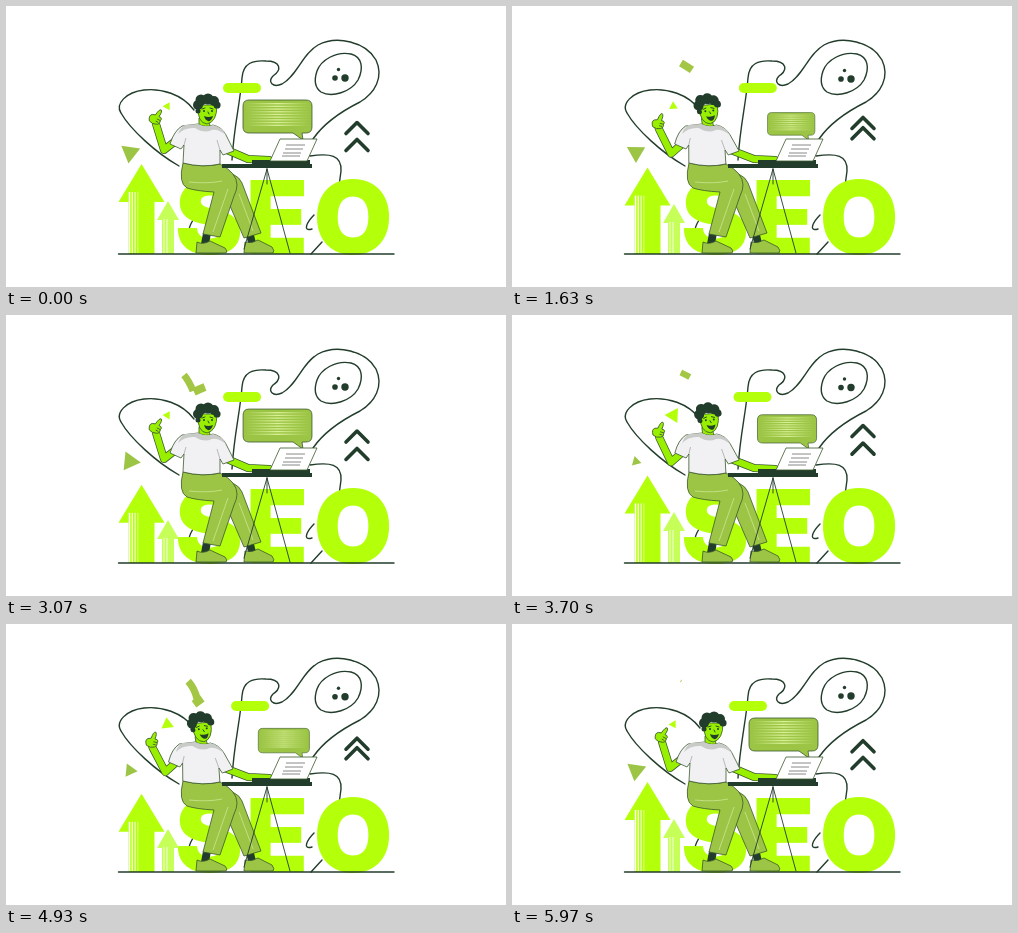
These frames come from a looping animation (500x281 px, 6000 ms). An HTML page:

```html
<!DOCTYPE html>
<html lang="en">
<head>
<meta charset="utf-8">
<title>SEO illustration</title>
<style>
  html, body { margin: 0; width: 100%; height: 100%; overflow: hidden; background: #fff; }
  svg { display: block; width: 100%; height: 100%; }
  .lime { fill: #b4ff0a; }
  .skin { fill: #98f000; }
  .olive { fill: #9cc545; }
  .dark { fill: #223d2b; }
  .edge { stroke: #3c5a2c; stroke-width: .8; stroke-linejoin: round; }
  .line { fill: none; stroke: #223d2b; stroke-width: 1.4; stroke-linecap: round; stroke-linejoin: round; }
  .thin { stroke-width: .9; }
  .chevron { stroke-width: 3.6; }
  .strip { fill: none; stroke: #a3c644; }
  .limb { fill: none; stroke-linejoin: round; stroke-linecap: round; }
  text { font: 900 102px Inter, "Open Sans", sans-serif; text-anchor: middle; }
</style>
</head>
<body>
<svg viewBox="0 0 500 281">
  <defs>
    <linearGradient id="fade">
      <stop offset="0" stop-color="#fff"/>
      <stop offset=".55" stop-color="#b4ff0a"/>
    </linearGradient>
    <linearGradient id="shine">
      <stop offset="0" stop-color="#9cc545"/>
      <stop offset=".5" stop-color="#dcf29a"/>
      <stop offset="1" stop-color="#9cc545"/>
    </linearGradient>
  </defs>

  <!-- looping outlines -->
  <g class="line">
    <path d="M188 104C176 88 155 82 138 84C120 86 109 98 115 107C124 123 150 147 173 160"/>
    <path d="M226 154C228 120 234 98 236 72C237 57 247 54 260 55C275 55 276 64 267 70C261 76 267 82 276 78C291 70 296 48 312 39C331 29 360 36 370 54C378 71 369 87 354 96C334 106 318 117 307 133"/>
    <path d="M311 65C315 54 330 45 345 48C356 51 358 62 352 74C345 86 326 92 315 86C308 81 308 74 311 65Z"/>
    <path d="M304 150C324 147 336 149 335 165L333 180M308 209C301 216 296 226 306 223M316 236L305 248"/>
    <path d="M187 214C181 224 181 231 192 231"/>
  </g>
  <g id="dots" class="dark">
    <circle cx="332.500" cy="63.500" r="1.700"/>
    <circle cx="329" cy="72" r="2.800"/>
    <circle cx="339" cy="72" r="3.700"/>
  </g>

  <g class="lime">
    <text x="203" y="248">S</text>
    <text x="271" y="248">E</text>
    <text x="347" y="248">O</text>
    <path id="arrow1"/>
    <path id="arrow2" style="fill:#c6ff58"/>
    <rect id="bar" y="77" width="38" height="10" rx="5"/>
  </g>
  <g id="stripes" stroke="#fff"></g>
  <path class="line" d="M112.500 248H388"/>

  <path id="tri1" class="olive"/>
  <path id="tri2" class="lime"/>
  <path id="strip1" class="strip"/>
  <path id="strip2" class="strip"/>
  <path id="chev1" class="line chevron" d="M340 12L351 1L362 12"/>
  <path id="chev2" class="line chevron" d="M340 12L351 1L362 12"/>

  <g id="bubble">
    <path class="olive edge" d="M243 94H300Q306 94 306 100V121Q306 127 300 127H296L297 134L287 127H243Q237 127 237 121V100Q237 94 243 94Z"/>
    <g id="shines" fill="url(#shine)"></g>
  </g>

  <!-- legs and shoes -->
  <path class="dark" d="M197 227H205L203 238H195ZM240 229H248L250 237H242Z"/>
  <path class="olive edge" d="M191 236Q197 239 204 235L219 242Q222 245 220 247H190Z"/>
  <path class="olive edge" d="M239 236Q246 238 252 234L266 241Q269 245 267 247H238Z"/>
  <path class="olive edge" d="M205 162Q232 166 236 177L255 227L238 232L218 186Z"/>
  <path class="olive edge" d="M177 157Q198 162 214 158Q231 167 231 179Q231 184 228 190L214 231L197 228L208 186Q190 185 181 182Q172 177 177 157Z"/>
  <path fill="none" stroke="#c2df82" d="M183 176Q202 178 216 175M222 183L207 226M233 188L247 225"/>

  <!-- table and laptop -->
  <path class="line thin" d="M261 163L238 243M261 163L284 247M261 163V178"/>
  <path class="dark" d="M216 158H306V162H216Z"/>

  <!-- seated figure -->
  <g id="armR" class="limb">
    <path stroke="#3c5a2c" stroke-width="8"/>
    <path stroke="#98f000" stroke-width="6.500"/>
  </g>
  <path class="dark" d="M246 154H304V158H246Z"/>
  <path class="edge" fill="#fff" d="M274 133H311L301 155H264Z"/>
  <path stroke="#888" d="M280 139H299M279 143H297M277 147H295M276 150H294"/>

  <g id="armL" class="limb">
    <path stroke="#3c5a2c" stroke-width="8"/>
    <path stroke="#98f000" stroke-width="6.500"/>
  </g>
  <g id="hand" class="skin edge">
    <path d="M-1-3Q0-10 2-10Q4-9 3-3H5Q7-2 6 0Q7 4 4 5Q0 7-4 5Q-7 0-4-2Z"/>
    <path fill="none" d="M2 0H6M2 2.500H5"/>
  </g>
  <g id="body">
    <g id="head">
      <path class="skin edge" d="M193 112L193 122Q199 126 204 121L203 112Z"/>
      <path class="skin edge" d="M192 99Q191 117 201 118Q211 116 211 99Z"/>
      <g class="dark">
        <circle cx="192" cy="99" r="5"/>
        <circle cx="195" cy="94" r="5.500"/>
        <circle cx="202" cy="93" r="5.500"/>
        <circle cx="208" cy="95" r="5"/>
        <circle cx="211" cy="99" r="3.600"/>
        <circle cx="192" cy="105" r="2.500"/>
        <circle cx="198" cy="105" r="1"/>
        <circle cx="206" cy="105" r="1"/>
        <path d="M198 110Q202 112 207 110Q205 116 202 115Q199 114 198 110Z"/>
      </g>
      <path class="line thin" d="M196 103L199 102M204 102L207 103M202 106L203 108"/>
    </g>
    <path class="edge" fill="#f1f1f4" d="M192 118Q200 122 207 119Q216 121 220 129L228 145L217 149L214 144V158Q196 162 177 157L178 139L175 143L164 138Q168 125 176 120Z"/>
    <path fill="#c9cbc9" d="M179 119L192 118Q200 122 207 119Q216 121 220 129Q212 123 206 124Q198 128 189 122Q179 121 172 128Q174 122 179 119Z"/>
    <path fill="none" stroke="#aaa" stroke-width=".8" d="M178 139L180 132M214 144L211 134"/>
  </g>
</svg>
<script>
const el = id => document.getElementById(id);
const set = (id, name, value) => el(id).setAttribute(name, value);
const mix = (a, b, k) => a + (b - a) * k;
const wave = (t, period, shift = 0) => Math.cos(2 * Math.PI * (t - shift) / period);
const smooth = k => k * k * (3 - 2 * k);

// Interpolates rows of [time, ...values]
function keyed(rows, t, ease = k => k) {
  const n = rows.findIndex(r => r[0] > t);
  if (n < 1) return rows[n ? rows.length - 1 : 0].slice(1);
  const a = rows[n - 1], b = rows[n];
  const k = ease((t - a[0]) / (b[0] - a[0]));
  return a.slice(1).map((v, i) => mix(v, b[i + 1], k));
}

const sway = [[0, 1], [.43, .05], [.77, 0], [1.07, 1], [1.37, .05], [1.63, .6], [1.97, 1], [2, 1]];

// time, start point, bend point, end point, width
const strips = [
  [[.3, 199, 79, 199, 79, 199, 79, 0], [.43, 193, 78, 197, 78, 201, 79, 4.5],
   [.77, 188, 84, 190, 81, 193, 77, 8], [1.07, 188, 77, 194, 74, 199, 72, 8],
   [1.37, 173, 60, 180, 66, 186, 73, 6], [1.63, 169, 57, 174, 60, 180, 64, 7.5],
   [1.95, 168, 59, 169, 57, 170, 55, 1.5], [2, 169, 57, 169, 57, 169, 57, 0]],
  [[.48, 198, 76, 198, 76, 198, 76, 0], [.77, 187, 54, 195, 62, 196, 74, 7.5],
   [1.07, 178, 60, 183, 66, 187, 76, 7], [1.37, 181, 49, 186, 55, 192, 60, 6],
   [1.58, 172, 56, 172, 56, 172, 56, 0]]
];

const arrow = (x, top, half, depth, stem) =>
  `M${x} ${top}L${x + half} ${top + depth}H${x + stem}V248H${x - stem}V${top + depth}H${x - half}Z`;

function triangle(x, y, r, deg) {
  const pts = [0, 120, 240].map(d => {
    const a = (deg + d) * Math.PI / 180;
    return `${x + r * Math.cos(a)} ${y + r * Math.sin(a)}`;
  });
  return `M${pts.join("L")}Z`;
}

el("shines").innerHTML = Array.from({ length: 9 }, (_, i) =>
  `<rect x="240" y="${97 + i * 2.7}" width="63" height="1.3"/>`).join("");

function limb(id, ...points) {
  for (const path of el(id).children) path.setAttribute("d", "M" + points.join("L"));
}

function draw(now) {
  const t = now / 1000 % 6, beat = t % 2;

  // bubble, bar and chevrons share a three second cycle
  const open = .5 + .5 * wave(t, 3), size = mix(.68, 1, open);
  set("bubble", "transform", `translate(296 134) scale(${size}) translate(-296 -134)`);
  set("bar", "x", mix(227, 217, open));
  set("chev1", "transform", `translate(0 ${112.5 + 4.5 * wave(t, 3, -.39)})`);
  set("chev2", "transform", `translate(0 ${126.5 + 6 * wave(t, 3)})`);
  set("dots", "transform", `translate(0 ${.5 - .5 * wave(t, 3)})`);

  const pulse = wave(t, 1.5);
  set("tri1", "d", triangle(124, 146.5, 8.3 + 2.7 * pulse, 111 - 26 * wave(t, 6, 1)));
  set("tri2", "d", triangle(161.3, 100.3, 6.7 - 2 * pulse, 165 + 22 * wave(t, 3, .39)));

  const rise = wave(t, 2), top = 164 - 6 * rise;
  set("arrow1", "d", arrow(135.5, top, 23, 38, 13));
  set("arrow2", "d", arrow(162, 200 - 5 * rise, 11, 19, 6));
  el("stripes").innerHTML = [0, 1, 2, 3].map(i =>
    `<path stroke-width="${1.5 - i * .3}" d="M${123.5 + i * 2.8} ${top + 28}V247"/>`).join("") +
    `<path stroke-width=".8" d="M158 ${218 - 5 * rise}V247M161 ${218 - 5 * rise}V247"/>`;

  strips.forEach((rows, i) => {
    const [x, y, bx, by, ex, ey, w] = keyed(rows, beat);
    set("strip" + (i + 1), "d", `M${x} ${y}Q${bx} ${by} ${ex} ${ey}`);
    set("strip" + (i + 1), "stroke-width", w);
  });

  const [s] = keyed(sway, beat, smooth);
  const lean = -.15 * (1 - s);
  set("body", "transform", `matrix(1 0 ${-lean} 1 ${160 * lean} 0)`);
  set("head", "transform", `rotate(${-13 * (1 - s)} 199 120)`);
  const hx = mix(141, 149, s), hy = mix(124, 112, s);
  set("hand", "transform", `translate(${hx} ${hy}) rotate(${mix(-4, 26, s)})`);
  limb("armL", [hx + 1, hy + 6], [mix(161, 158, s), mix(153, 144, s)], [mix(170, 172, s), mix(143, 133, s)]);
  limb("armR", [mix(215, 221, s), 144], [242, 153], [263, 154]);

  requestAnimationFrame(draw);
}
requestAnimationFrame(draw);
</script>
</body>
</html>
```
